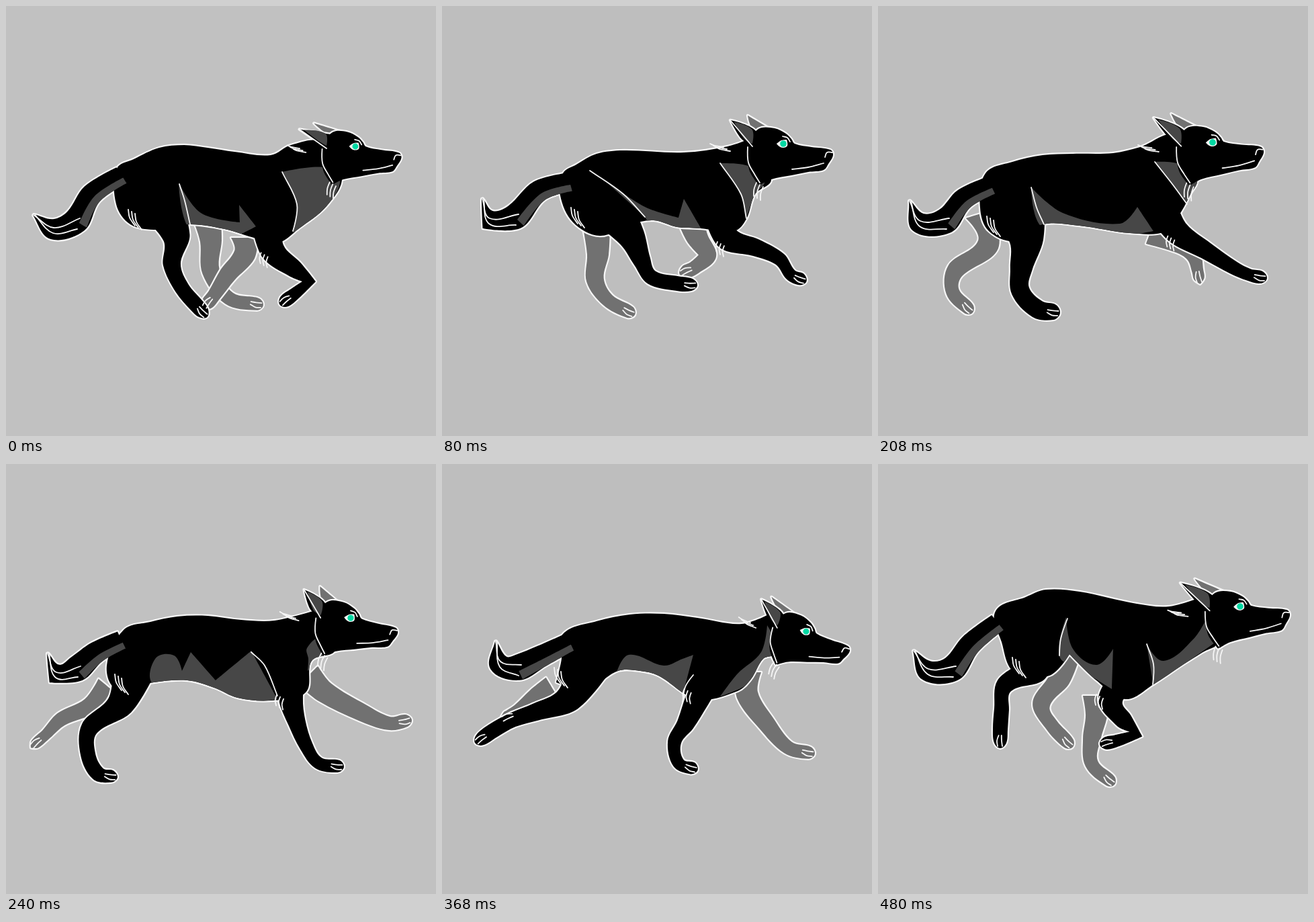
An HTML page with a canvas for the animation above (0.56 s loop, 640x640 px).

```html
<!DOCTYPE html>
<html lang="en">
<head>
<meta charset="utf-8">
<title>Running wolf</title>
<style>
html, body { margin: 0; width: 100%; height: 100%; overflow: hidden; background: #c0c0c0; }
canvas { display: block; }
</style>
</head>
<body>
<canvas id="stage" width="640" height="640"></canvas>
<script>
const ctx = document.getElementById('stage').getContext('2d');
const STEP = 80, WHITE = '#f6f6f6', LIGHT = '#c1c1c1', DARK = '#bebebe';
const poses = [];

function points(text) {
  const n = text.split(' ').map(Number), pts = [];
  for (let i = 0; i < n.length; i += 2) pts.push([n[i], n[i + 1]]);
  return pts;
}

// Smooth curve through the points; sharp turns stay corners.
function curve(pts, closed = true) {
  const count = pts.length, path = new Path2D();
  const at = i => closed ? pts[(i + count) % count] : pts[Math.max(0, Math.min(count - 1, i))];
  const tangent = i => {
    const [ax, ay] = at(i - 1), [bx, by] = at(i), [cx, cy] = at(i + 1);
    const turn = Math.atan2(cy - by, cx - bx) - Math.atan2(by - ay, bx - ax);
    const len = Math.hypot(cx - ax, cy - ay) || 1;
    return Math.cos(turn) < 0.1 ? [0, 0] : [(cx - ax) / len, (cy - ay) / len];
  };
  path.moveTo(...pts[0]);
  for (let i = 0; i < count - (closed ? 0 : 1); i++) {
    const [ax, ay] = at(i), [bx, by] = at(i + 1);
    const [ux, uy] = tangent(i), [vx, vy] = tangent(i + 1);
    const k = Math.hypot(bx - ax, by - ay) / 3;
    path.bezierCurveTo(ax + ux * k, ay + uy * k, bx - vx * k, by - vy * k, bx, by);
  }
  if (closed) path.closePath();
  return path;
}

function direction(pts, i) {
  const [ax, ay] = pts[Math.max(0, i - 1)], [bx, by] = pts[Math.min(pts.length - 1, i + 1)];
  const len = Math.hypot(bx - ax, by - ay);
  return [(bx - ax) / len, (by - ay) / len];
}

// A ribbon of varying half-width along a spine, from side a to side b.
function limb(pts, widths, a = -1, b = 1, tip = 0) {
  const side = s => pts.map(([x, y], i) => {
    const [dx, dy] = direction(pts, i);
    return [x - dy * widths[i] * s, y + dx * widths[i] * s];
  });
  const last = pts.length - 1, [dx, dy] = direction(pts, last), [x, y] = pts[last];
  const cap = tip ? [[x + dx * tip, y + dy * tip]] : [];
  return curve([...side(a), ...cap, ...side(b).reverse()]);
}

function toes(pts) {
  const last = pts.length - 1, [x, y] = pts[last], [dx, dy] = direction(pts, last);
  return [-3, 4].map(o => curve([
    [x - dx * 11 - dy * o * 0.6, y - dy * 11 + dx * o * 0.6],
    [x - dx * 3 - dy * (o + 1), y - dy * 3 + dx * (o + 1)],
    [x + dx * 5 - dy * o, y + dy * 5 + dx * o]
  ], false));
}

// Three bent strands of fur leaving one spot.
function fur(x, y, dx, dy) {
  return [0, 1, 2].map(i => {
    const sx = x + i * 5, sy = y + i * 3;
    return curve([[sx, sy], [sx + dx * 0.4 - 2, sy + dy * 0.5], [sx + dx, sy + dy]], false);
  });
}

const HIND = [34, 20, 13, 11, 11, 9], FORE = [23, 18, 13, 10, 9, 9];
const FAR = [20, 16, 13, 10, 9], TAIL = [1, 15, 19, 16, 14];
const skull = curve(points('-50 0 -36 -22 -12 -23 5 -15 13 -7 18 0 43 5 71 9 75 17 68 30 61 39 38 42 13 47 -17 53 -35 62 -50 38'));
const face = ['14 38 38 35 61 29', '63 20 66 13 74 13', '-52 5 -51 28 -42 45 -34 58', '0 -11 7 -9 11 -3']
  .map(t => curve(points(t), false));
const eyeWhite = curve(points('-9 0 -2 -5 6 -6 7 3 1 6 -5 4'));
const iris = new Path2D();
iris.arc(1, 0, 4.8, 0, Math.PI * 2);

// head: eye x, eye y, turn in degrees, scale; ears: the two tips beside the eye.
function pose(p) {
  const [x, y, turn, size] = p.head;
  const matrix = new DOMMatrix().translate(x, y).rotate(turn).scale(size);
  const onHead = path => {
    const placed = new Path2D();
    placed.addPath(path, matrix);
    return placed;
  };
  const [near, far] = points(p.ears);
  const mid = (a, b, k) => [a[0] + (b[0] - a[0]) * k, a[1] + (b[1] - a[1]) * k];
  const earFront = [-40, -19], earBack = [-45, 4];
  const body = points(p.body), tail = points(p.tail);
  const hind = points(p.hind), fore = points(p.fore);
  const farLegs = p.far.map(points), [k1, k2] = p.thin || [1, 1];
  const rump = body[body.length - 2], elbow = fore[1];
  const [ex, ey] = direction(fore, 1);

  poses.push({
    bg: p.bg,
    far: farLegs.map((leg, i) => limb(leg, FAR.map(w => w * (i ? k2 : k1)), -1, 1, 8)),
    near: [
      curve(body), limb(tail, TAIL),
      limb(hind, HIND.map(w => w * (p.thigh || 1)), -1, 1, 8),
      limb(fore, FORE, -1, 1, 8)
    ],
    head: [skull, curve([near, earFront, earBack, [-62, -8]])].map(onHead),
    farEar: onHead(curve([far, [-20, -23], [-42, -19]])),
    innerEar: onHead(curve([mid(near, earFront, 0.15), mid(near, earFront, 0.85), [-45, 0], [-57, -7]])),
    shade: [p.belly, p.neck].map(t => curve(points(t))),
    tailShade: limb(tail.slice(2), TAIL.slice(2), 0.3, 1),
    seams: [
      ...p.seams.map(t => curve(points(t), false)),
      ...[hind, fore, ...farLegs].flatMap(toes),
      ...face.map(onHead),
      ...fur(-108, 0, 20, 5).map(onHead),
      ...fur(-39, 58, -4, 20).map(onHead),
      onHead(curve([near, mid(near, earBack, 0.5), earBack], false)),
      ...fur(rump[0] - 3, rump[1] - 22, 10, 24),
      ...fur(elbow[0] - ey * 17 - 4, elbow[1] + ex * 17 - 8, -1, 16),
      curve(tail.slice(0, 3).map(([tx, ty], i) => [tx + 2, ty + i * 6]), false),
      curve(tail.slice(0, 3).map(([tx, ty], i) => [tx + i * 3, ty - i * 2]), false)
    ],
    matrix
  });
}

pose({
  bg: LIGHT, head: [519, 209, 1, 0.93], ears: '-89 -26 -66 -36',
  body: '165 242 190 228 228 211 265 207 300 211 340 217 394 222 424 207 470 203 500 254 478 297 435 332 405 352 362 343 330 333 275 325 225 333 185 325 164 295',
  tail: '41 311 68 332 104 320 128 280 172 252',
  hind: '225 290 254 345 247 385 262 420 284 446 294 457',
  fore: '390 330 398 366 430 392 451 410 430 428 414 440',
  far: ['300 320 305 350 305 395 332 435 375 444', '355 345 355 370 330 400 310 430 299 444'],
  belly: '257 263 290 308 348 322 347 296 372 328 330 345 275 335',
  neck: '411 247 433 295 427 340 478 297 497 257 472 240',
  seams: ['258 265 266 290 274 325', '411 247 433 295 427 335']
});

pose({
  bg: DARK, head: [507, 205, 0, 1], ears: '-78 -35 -52 -42',
  body: '180 249 200 236 230 220 270 215 360 218 425 209 465 195 490 258 466 280 453 317 435 335 385 331 350 329 315 319 280 325 235 342 195 322 176 282',
  tail: '60 287 68 318 108 314 145 275 190 262',
  hind: '250 300 283 345 298 380 312 404 350 413 372 415',
  fore: '415 315 425 346 468 360 503 377 519 400 535 407',
  far: ['230 330 232 370 228 408 247 438 280 456', '372 320 380 345 395 372 375 390 361 396'],
  belly: '240 258 302 299 352 315 360 287 388 335 315 330 300 312',
  neck: '414 234 445 280 453 316 466 280 480 260 456 238',
  seams: ['220 245 270 280 302 314', '414 234 445 280 453 316']
});

pose({
  bg: DARK, head: [497, 203, -2, 1.02], ears: '-84 -39 -58 -44', thigh: 1.25, thin: [1, 0.85],
  body: '160 249 200 232 245 222 290 220 350 219 390 210 445 193 475 258 465 280 452 305 430 335 375 338 300 327 245 325 205 350 165 335 152 300',
  tail: '47 290 60 322 100 320 128 287 168 267',
  hind: '207 300 221 350 213 392 212 424 237 451 263 456',
  fore: '425 305 447 338 488 364 530 390 552 400 571 404',
  far: ['150 310 164 355 115 394 111 425 135 451', '405 338 450 355 470 372 476 395 478 406'],
  belly: '228 270 275 308 360 324 386 299 410 335 330 345 245 330',
  neck: '412 232 438 265 460 295 465 280 478 258 447 235',
  seams: ['228 270 236 300 247 325', '412 232 438 265 460 295']
});

pose({
  bg: LIGHT, head: [512, 229, 5, 0.97], ears: '-74 -37 -50 -44', thin: [0.8, 1],
  body: '175 247 215 235 255 227 300 226 350 232 400 233 470 215 490 276 455 293 446 340 395 352 345 348 310 333 270 322 220 325 165 335 150 300',
  tail: '62 282 72 312 105 305 135 280 172 262',
  hind: '190 300 170 358 124 394 122 432 137 461 158 465',
  fore: '425 300 424 350 433 385 447 420 465 445 495 450',
  far: ['150 330 125 360 82 380 60 402 43 417', '450 315 475 340 530 370 570 386 596 382'],
  belly: '222 290 250 285 262 308 275 280 312 322 365 278 404 350 330 355 220 328',
  neck: '448 274 450 290 449 308 470 290 490 276 469 258',
  seams: ['365 280 385 300 404 345']
});

pose({
  bg: DARK, head: [541, 249, 12, 0.94], ears: '-79 -35 -64 -42',
  body: '180 253 230 234 280 224 330 223 380 229 446 238 490 222 500 280 478 290 460 320 440 338 380 350 322 315 295 308 262 308 215 335 170 325 178 290',
  tail: '80 264 84 296 112 303 150 285 190 265',
  hind: '222 290 188 350 140 369 105 381 76 397 56 411',
  fore: '405 300 380 350 362 388 346 414 352 445 373 453',
  far: ['165 335 140 350 115 370 100 376 95 378', '455 310 455 345 482 385 515 422 547 430'],
  belly: '260 310 278 284 330 300 358 290 374 284 358 345 300 315',
  neck: '475 280 440 312 414 346 460 325 498 282 484 240',
  seams: ['374 314 362 332 358 356']
});

pose({
  bg: LIGHT, head: [543, 238, 9, 0.96], ears: '-87 -48 -60 -54', thin: [0.85, 1],
  body: '190 242 230 219 270 215 320 221 410 228 465 214 510 215 510 280 488 292 456 324 440 343 380 350 340 350 300 325 276 318 230 335 200 322 187 280',
  tail: '66 290 80 311 116 316 145 288 190 260',
  hind: '245 300 238 346 172 357 158 385 145 410 131 423',
  fore: '385 310 362 360 344 395 329 429 300 439 281 436',
  far: ['190 350 196 375 208 395 217 415 219 434', '385 345 385 375 382 410 395 438 428 463'],
  belly: '276 318 285 256 305 305 340 312 362 288 343 355 300 330',
  neck: '425 346 430 287 470 262 484 235 505 282 456 324',
  seams: ['288 255 277 275 276 318']
});

pose({
  bg: LIGHT, head: [538, 212, -3, 0.99], ears: '-87 -40 -65 -45',
  body: '175 219 220 198 250 187 300 190 385 208 434 212 490 195 515 258 482 281 455 298 410 328 368 350 325 322 285 283 255 315 203 310 184 265',
  tail: '53 278 72 307 110 305 138 268 178 236',
  hind: '235 275 232 308 188 330 184 365 182 395 182 415',
  fore: '370 320 346 352 366 382 384 402 355 412 338 416',
  far: ['280 285 270 320 243 358 258 388 284 416', '325 345 325 375 318 410 318 446 346 472'],
  belly: '270 286 280 228 290 275 325 299 350 275 348 335 300 305',
  neck: '400 268 425 293 470 260 490 228 510 260 410 330',
  seams: ['282 230 272 260 270 285', '400 268 410 298 409 328']
});

function fillAll(paths, color) {
  ctx.fillStyle = color;
  paths.forEach(path => ctx.fill(path));
}

function strokeAll(paths, width) {
  ctx.lineWidth = width;
  paths.forEach(path => ctx.stroke(path));
}

function draw({ bg, far, near, head, farEar, innerEar, shade, tailShade, seams, matrix }) {
  ctx.fillStyle = bg;
  ctx.fillRect(0, 0, 640, 640);
  ctx.strokeStyle = WHITE;
  ctx.lineJoin = ctx.lineCap = 'round';
  for (const part of [...far, farEar]) {
    strokeAll([part], 4.4);
    fillAll([part], '#717171');
  }
  strokeAll([...near, ...head], 4.4);
  fillAll(near, '#000');
  fillAll([tailShade], '#474747');
  ctx.save();
  ctx.clip(near[0]);
  fillAll(shade, '#474747');
  ctx.restore();
  fillAll(head, '#000');
  fillAll([innerEar], '#474747');
  strokeAll(seams, 1.8);
  ctx.save();
  ctx.setTransform(matrix);
  fillAll([eyeWhite], WHITE);
  fillAll([iris], '#00d9a3');
  ctx.restore();
}

function tick() {
  draw(poses[Math.floor(performance.now() / STEP) % poses.length]);
  requestAnimationFrame(tick);
}
tick();
</script>
</body>
</html>
```
